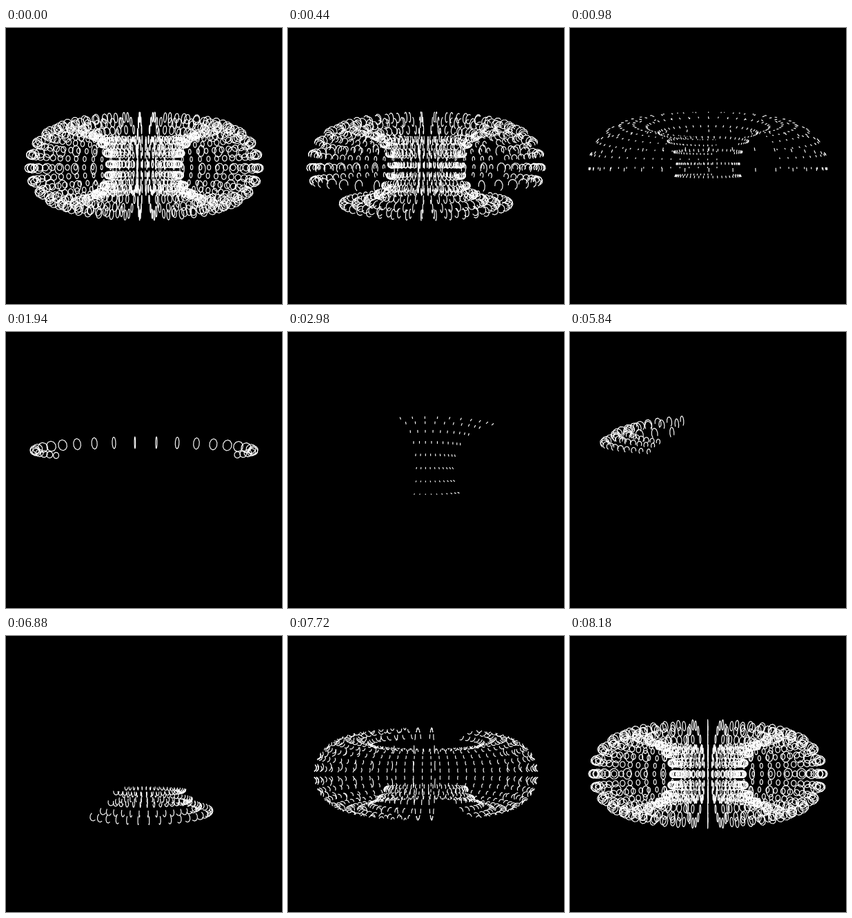
An HTML page with a canvas for the animation above (8.2 s loop, 400 by 400 pixels).

```html
<!DOCTYPE html>
<html>
<head>
<meta charset="utf-8">
<style>
html, body { margin: 0; width: 100%; height: 100%; overflow: hidden; background: #000; }
canvas { display: block; }
</style>
</head>
<body>
<canvas id="stage" width="400" height="400"></canvas>
<script>
const ctx = document.getElementById('stage').getContext('2d');
const TAU = 2 * Math.PI;
const FPS = 30, FRAMES = 246;
const EYE = 200 * Math.sqrt(3); // camera distance for a 60° field of view

// Angles of a turning window that opens and closes over n equal steps
function sweep(n, phase) {
  const count = n * (1 + Math.cos(phase)) / 2;
  const angles = [];
  for (let i = 0; i < count; i++) angles.push(2 * phase + i * TAU / n);
  return angles;
}

function draw(theta) {
  ctx.fillStyle = '#000';
  ctx.fillRect(0, 0, 400, 400);
  ctx.strokeStyle = '#fff';
  ctx.lineWidth = 1.15;
  ctx.lineJoin = 'round';

  const ring = sweep(50, theta);
  const tube = sweep(20, 2 * theta);
  const loop = sweep(10, 4 * theta);
  loop.push(loop[loop.length - 1] + TAU / 10);

  for (const a of ring) {
    const ca = Math.cos(a), sa = Math.sin(a);
    for (const b of tube) {
      ctx.beginPath();
      for (const c of loop) {
        const r = 100 + 50 * Math.cos(b) + 5 * Math.cos(b + c);
        const y = 50 * Math.sin(b) + 5 * Math.sin(b + c);
        const scale = EYE / (EYE + r * sa);
        ctx.lineTo(200 + r * ca * scale, 200 + y * scale);
      }
      ctx.stroke();
    }
  }
}

const start = performance.now();
let shown = -1;

function tick() {
  const time = Math.max(0, performance.now() - start);
  const frame = Math.max(0, Math.floor(time * FPS / 1000 - 1e-6)) % FRAMES;
  if (frame !== shown) {
    shown = frame;
    draw(0.0125 * Math.max(1, 2 * frame));
  }
  requestAnimationFrame(tick);
}
tick();
</script>
</body>
</html>
```
